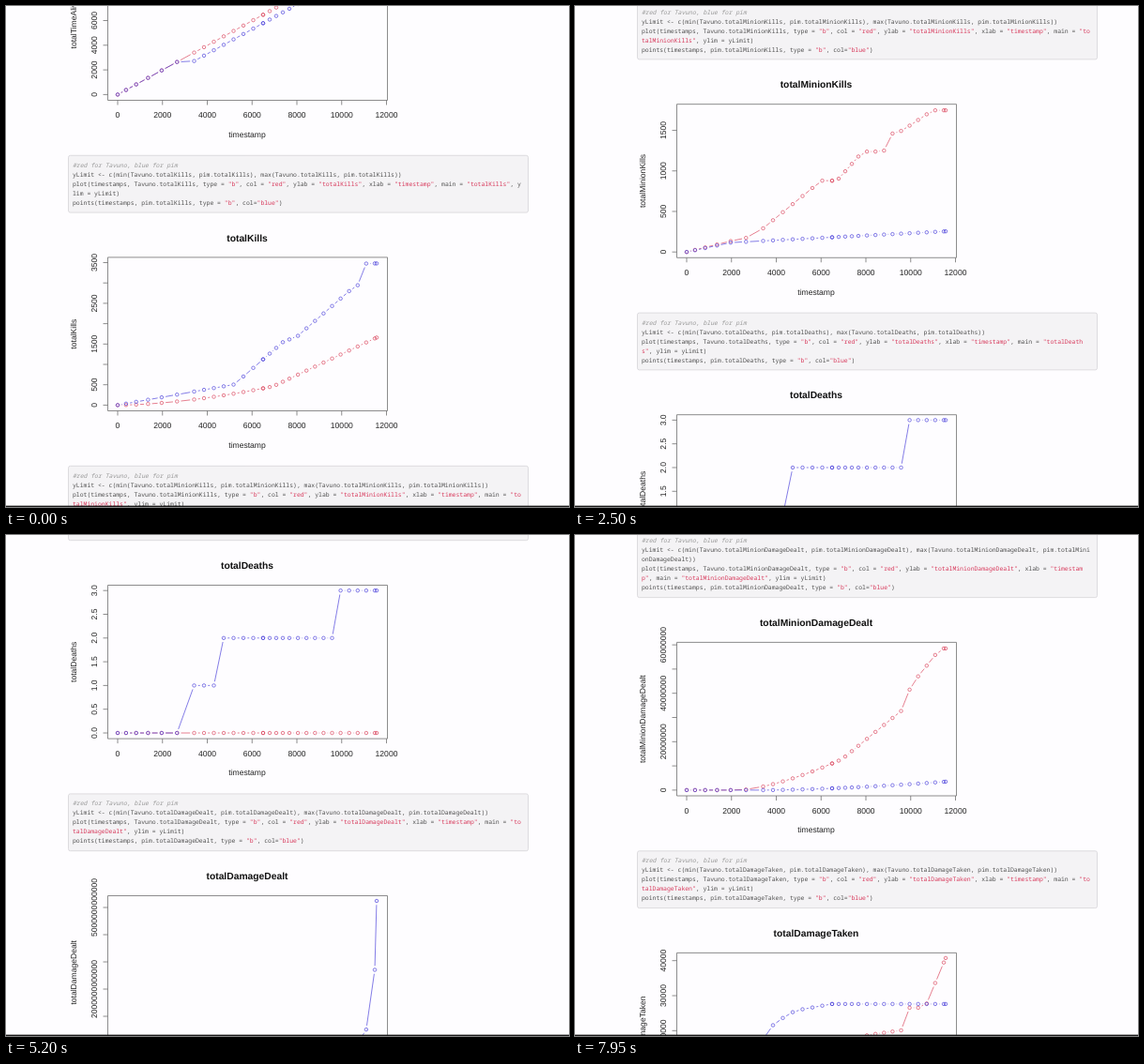
An HTML page that plays this animation: 600x534 px, repeating every 8000 ms.

```html
<!DOCTYPE html>
<html lang="en">
<head>
<meta charset="utf-8">
<title>Match statistics</title>
<style>
html, body { margin: 0; width: 100%; height: 100%; overflow: hidden; background: #fefdff; }
svg { display: block; }
text { font: 8.57px "Liberation Sans", Arial, sans-serif; fill: #222; white-space: pre; text-rendering: geometricPrecision; }
.mid { text-anchor: middle; }
.title { font-size: 10.3px; font-weight: bold; fill: #111; }
.code { font: 6.43px "Noto Sans Mono", "DejaVu Sans Mono", monospace; fill: #505050; }
.note { font-style: italic; fill: #999; }
.str { fill: #d83a5c; }
.box { fill: #f4f3f5; stroke: #d6d5d8; stroke-width: .8; }
.axis { fill: none; stroke: #707070; stroke-width: .8; }
.red, .blue { fill: none; stroke-width: .7; }
.red { stroke: #dc4a60; }
.blue { stroke: #4f46dc; }
</style>
</head>
<body>
<svg width="600" height="534" viewBox="0 0 600 534">
  <g id="page"></g>
  <rect y="532.6" width="600" height="1.4" fill="#1a1a1a"/>
</svg>
<script>
const A = 'Tavuno', B = 'pim';
const BOX = { x: 108.5, w: 298, h: 163.6 }, MID = 257, X0 = 119, SPAN = 276, PAD = 6.1, EM = 8.57;

// sum of rises, each [from, to, height, power]
const climb = (rises, t) => rises.reduce((sum, [from, to, height, power = 1]) =>
  sum + height * Math.min(1, Math.max(0, (t - from) / (to - from))) ** power, 0);

// samples drift apart, then come at an even pace; two share one place
const xs = Array.from({ length: 30 }, (_, i) => X0 + (i < 6 ? 8 * i + .93 * i * i :
  81.5 + climb([[6, 13, 73.5], [14, 18, 28], [18, 28, 91], [28, 29, 2]], i)));

// tick: value of a step, step: its height in px; rises run over the time axis from 0 to 1
const charts = [
  { name: 'totalTimeAlive', tick: 2000, step: 26.3,
    red: [[0, 1, 151.5]], blue: [[0, 1, 151.5], [.23, .29, -9]] },
  { name: 'totalKills', tick: 500, step: 21.7,
    red: [[0, .6, 20, 1.7], [.6, 1, 52]],
    blue: [[0, .45, 22], [.45, .65, 48], [.68, .9, 53], [.92, .96, 28]] },
  { name: 'totalMinionKills', tick: 500, step: 43.2,
    red: [[0, .22, 15], [.25, .52, 61], [.58, .68, 31], [.76, .8, 22], [.83, .95, 22]],
    blue: [[0, .17, 10], [.17, 1, 12]] },
  { name: 'totalDeaths', tick: .5, step: 25.3, digits: 1,
    red: [], blue: [[.23, .29, 50.6], [.38, .4, 50.6], [.835, .86, 50.6]] },
  { name: 'totalDamageDealt', tick: 1e12, step: 29,
    red: [], blue: [[.93, .96, 15], [.96, .993, 64], [.993, 1, 73]] },
  { name: 'totalMinionDamageDealt', tick: 1e7, step: 25.8,
    red: [[.2, .6, 33, 1.5], [.6, .84, 54], [.83, .87, 26], [.87, .98, 38]],
    blue: [[.3, 1, 9, 1.6]] },
  { name: 'totalDamageTaken', tick: 10000, step: 37.3,
    red: [[0, .7, 70], [.7, .83, 5], [.83, .86, 24], [.92, 1, 53]],
    blue: [[0, .23, 40], [.23, .34, 43], [.34, .42, 13], [.42, .56, 7]] }
];

// from ms, to ms, px
const scrolls = [[0, 2050, 379.5], [2050, 2800, 191.2], [3100, 3950, 132.9],
  [4400, 5200, 172.8], [5450, 6300, 264.4], [6650, 7950, 346.7]];

const text = (x, y, s, cls = 'mid') => `<text x="${x}" y="${y}" class="${cls}">${s}</text>`;
const upright = (x, y, s) => `<text class="mid" transform="translate(${x} ${y}) rotate(-90)">${s}</text>`;
const path = (d, cls) => `<path d="${d}" class="${cls}"/>`;

function series(rises, base, cls) {
  const pts = xs.map(x => [x, base - climb(rises, (x - X0) / SPAN)]);
  const gap = EM / 2, r = 1.75;
  let d = '';
  pts.forEach(([x, y], i) => {
    d += `M${x - r} ${y}a${r} ${r} 0 1 0 ${2 * r} 0a${r} ${r} 0 1 0 ${-2 * r} 0`;
    if (!i) return;
    const [px, py] = pts[i - 1], dx = x - px, dy = y - py, len = Math.hypot(dx, dy);
    if (len <= 2 * gap) return;
    const k = gap / len;
    d += `M${px + dx * k} ${py + dy * k}L${x - dx * k} ${y - dy * k}`;
  });
  return path(d, cls);
}

function codeLines(name) {
  return [
    `#red for ${A}, blue for ${B}`,
    `yLimit <- c(min(${A}.${name}, ${B}.${name}), max(${A}.${name}, ${B}.${name}))`,
    `plot(timestamps, ${A}.${name}, type = "b", col = "red", ylab = "${name}", xlab = "timestamp", main = "${name}", ylim = yLimit)`,
    `points(timestamps, ${B}.${name}, type = "b", col="blue")`
  ].flatMap(s => s.match(/.{1,124}(?![",)])/g));
}

function codeBlock(lines, y) {
  let open = false;
  const mark = s => `<tspan class="str">${s}</tspan>`;
  return `<rect class="box" x="66.5" y="${y - 10.2}" width="490" height="${lines.length * 10 + 10.8}" rx="2"/>` +
    lines.map((line, i) => {
      const strings = open ? /^[^"]*"|"[^"]*("|$)/g : /"[^"]*("|$)/g;
      if (line.split('"').length % 2 === 0) open = !open;
      const html = line.replace('<', '&lt;').replace(strings, mark);
      return text(71, y + 2.4 + i * 10, html, i ? 'code' : 'code note');
    }).join('');
}

function plot(c, y) {
  const top = y + 20.9, bottom = top + BOX.h, base = bottom - PAD;
  let d = `M${BOX.x} ${top}h${BOX.w}v${BOX.h}h${-BOX.w}z`;
  let out = text(MID, y + 3.6, c.name, 'mid title') + text(MID, bottom + 39.3, 'timestamp') +
    upright(75, top + BOX.h / 2, c.name);
  for (let i = 0; i <= 6; i++) {
    const x = X0 + i * 47.75;
    d += `M${x} ${bottom}v5`;
    out += text(x, bottom + 18.8, i * 2000);
  }
  // labels that would crowd the one before are skipped
  let end = -99;
  for (let i = 0; i * c.step < BOX.h - PAD; i++) {
    const h = i * c.step, label = (i * c.tick).toFixed(c.digits || 0);
    const half = EM * (label.length * .556 - (c.digits ? .278 : 0)) / 2;
    d += `M${BOX.x} ${base - h}h-5`;
    if (h - half < end + EM * .833) continue;
    out += upright(96.5, base - h, label);
    end = h + half;
  }
  return path(d, 'axis') + out + series(c.red, base, 'red') + series(c.blue, base, 'blue');
}

const page = document.getElementById('page');
let y = -161.5, html = '';
for (const c of charts) {
  const lines = codeLines(c.name), titleY = y + lines.length * 10 + 27.5;
  html += codeBlock(lines, y) + plot(c, titleY);
  y = titleY + 253.5;
}
page.innerHTML = html;

function frame() {
  const t = Math.floor(performance.now() % 8000 / 50) * 50;
  page.setAttribute('transform', `translate(0 ${-climb(scrolls, t)})`);
  requestAnimationFrame(frame);
}
frame();
</script>
</body>
</html>
```
